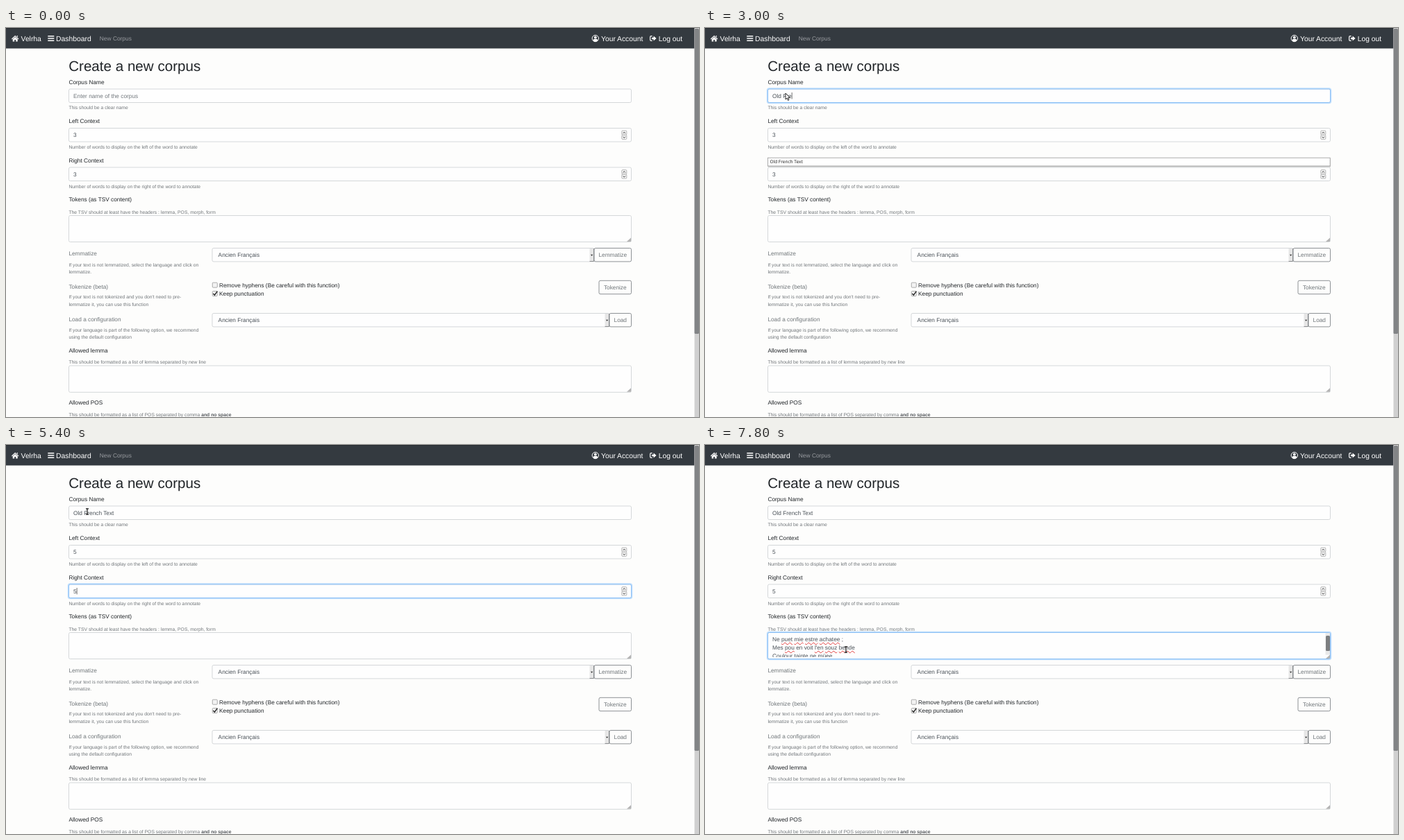
An HTML page that plays this animation: 998x561 px, repeating every 8 s.

```html
<!DOCTYPE html>
<html lang="en">
<head>
<meta charset="utf-8">
<title>Create a new corpus</title>
<style>
  html, body { margin: 0; width: 100%; height: 100%; overflow: hidden; background: #fdfdfc; }
  #stage { position: absolute; left: 0; top: 0; width: 998px; height: 561px; overflow: hidden; }
  svg { position: absolute; left: 0; top: 0; }
  text, #verse { font-family: "Liberation Sans", Arial, sans-serif; text-rendering: geometricPrecision; white-space: pre; }
  .label { font-size: 8.3px; fill: #212529; }
  .soft { font-size: 8.3px; fill: #6f7579; }
  .value { font-size: 8.3px; fill: #495057; }
  .help { font-size: 6.81px; fill: #72777b; }
  .brand { font-size: 10.3px; fill: #fff; }
  .box { fill: #fefefe; stroke: #cbced1; stroke-width: .8; }
  .button { fill: #fdfdfc; stroke: #71777c; stroke-width: .8; }
  .focus { fill: none; stroke: #84bdf6; stroke-width: .9; }
  .glow { fill: none; stroke: #bfdefd; stroke-width: 1.6; }
  #pane { position: absolute; left: 97px; top: 273.5px; width: 790px; height: 32px; overflow: hidden; }
  #verse { font-size: 8.3px; line-height: 12.48px; color: #495057; }
  #verse u { text-decoration: underline wavy #e23b3b .5px; text-underline-offset: 1px; text-decoration-skip-ink: none; }
  #verse i { display: inline-block; width: .7px; height: 9px; background: #333; vertical-align: -1.5px; }
</style>
</head>
<body>
<div id="stage">
  <svg id="page" width="998" height="561"></svg>
  <div id="pane"><div id="verse"></div></div>
  <svg id="over" width="998" height="561"></svg>
</div>
<script>
const $ = id => document.getElementById(id);
let layer = $('page');

function add(tag, attrs, parent = layer) {
  const el = document.createElementNS('http://www.w3.org/2000/svg', tag);
  for (const k in attrs) el.setAttribute(k, attrs[k]);
  return parent.appendChild(el);
}
function text(x, y, str, cls, more = {}) {
  const el = add('text', { x, y, class: cls, ...more });
  el.textContent = str;
  return el;
}
const rect = (x, y, width, height, more) => add('rect', { x, y, width, height, ...more });
const path = (d, more) => add('path', { d, ...more });
const group = () => add('g', {});
const show = (el, on) => el.style.display = on ? '' : 'none';

const label = (y, str) => text(90.4, y, str, 'label');
const help = (y, ...rows) => rows.forEach((s, i) => text(90.4, y + i * 10.1, s, 'help'));
const box = (y, h = 19.5, x = 90.5, w = 810) => rect(x, y, w, h, { rx: 2, class: 'box' });

function button(x, y, str) {
  rect(x, y, 900.5 - x, 19.4, { rx: 2, class: 'button' });
  text((x + 900.5) / 2, y + 12.7, str, 'soft', { 'text-anchor': 'middle' });
}
function select(y, right) {
  box(y, 19.4, 297, right - 297);
  text(305.6, y + 12.7, 'Ancien Français', 'value');
  rect(right - 6.5, y + .5, 6, 18.5, { fill: '#e6e6e6' });
  path(`M${right - .5} ${y + .5}v18.5h-6`, { fill: 'none', stroke: '#77797b', 'stroke-width': .8 });
  path(`M${right - 5} ${y + 9.2}h3.2l-1.6 2z`, { fill: '#222' });
}
function spinner(y) {
  for (const [dy, d] of [[0, 'M888.6 4l1.7-1.9 1.7 1.9'], [6.3, 'M888.6 2.4l1.7 1.9 1.7-1.9']]) {
    const g = add('g', { transform: `translate(0 ${y + dy})`, fill: 'none' });
    add('rect', { x: 886.8, y: 0, width: 7, height: 6.2, rx: 1.2, stroke: '#9c9c9c', 'stroke-width': .7, fill: '#f4f4f4' }, g);
    add('path', { d, stroke: '#333', 'stroke-width': .9 }, g);
  }
}
function grip(y) {
  path(`M900 ${y - 5.5}V${y}h-6z`, { fill: '#b4b4b4' });
}
function check(y, on) {
  rect(297.3, y, 7, 7, { rx: 1, fill: '#f3f3f3', stroke: '#8b8b8b', 'stroke-width': .7 });
  if (on) path(`M298.4 ${y + 3.4}l2 2.2 4-5.6`, { fill: 'none', stroke: '#222', 'stroke-width': 1.4 });
}

// Navigation bar and page scrollbar
rect(0, 0, 991.5, 29.5, { fill: '#343a40' });
rect(0, 0, 998, .9, { fill: '#25292c' });
path('M8 15.6L13.2 10.8 18.4 15.6 17.6 16.4 13.2 12.3 8.8 16.4zM9.7 16.2L13.2 13 16.7 16.2V19.6H14.2V17H12.2V19.6H9.7zM15.6 11h1.3v2.2l-1.3-1.2z', { fill: '#fff' });
text(21.6, 18.8, 'Velrha', 'brand');
path('M60.3 11.7h9M60.3 15h9M60.3 18.3h9', { stroke: '#fff', 'stroke-width': 1.5 });
text(72, 18.8, 'Dashboard', 'brand', { style: 'font-size:10.4px' });
text(134.8, 18, 'New Corpus', 'soft', { style: 'font-size:8.4px;fill:#989b9f' });
add('circle', { cx: 848.8, cy: 15, r: 4.7, fill: 'none', stroke: '#fff', 'stroke-width': 1 });
add('circle', { cx: 848.8, cy: 13.5, r: 1.9, fill: '#fff' });
path('M845.3 17.8q.8-2 2.1-2h2.8q1.3 0 2.1 2-1.3 1.9-3.5 1.9t-3.5-1.9z', { fill: '#fff' });
text(857, 18.8, 'Your Account', 'brand');
path('M930.6 11.6h-1.6q-1.3 0-1.3 1.3v4.2q0 1.3 1.3 1.3h1.6', { fill: 'none', stroke: '#fff', 'stroke-width': 1.2 });
path('M930 13.8h2.6v-2.4l4 3.6-4 3.6v-2.4H930z', { fill: '#fff' });
text(939.8, 18.8, 'Log out', 'brand');
rect(991.5, 0, 6.5, 561, { fill: '#d0d0d0' });
rect(991.5, 1, 6.5, 440, { rx: 1.5, fill: '#828486' });

// Form
text(90.2, 62, 'Create a new corpus', 'label', { style: 'font-size:20.6px' });
label(80.6, 'Corpus Name');
box(88);
help(117, 'This should be a clear name');
label(137.2, 'Left Context');
box(144.5);
spinner(148);
help(173.6, 'Number of words to display on the left of the word to annotate');
label(193.8, 'Right Context');
box(201);
spinner(204.6);
help(230.6, 'Number of words to display on the right of the word to annotate');
label(250.4, 'Tokens (as TSV content)');
help(267.7, 'The TSV should at least have the headers : lemma, POS, morph, form');
box(270.5, 38);
grip(308);

text(90.4, 328.4, 'Lemmatize', 'soft');
help(343.6, 'If your text is not lemmatized, select the language and click on', 'lemmatize.');
select(317.5, 847);
button(847, 317.5, 'Lemmatize');
text(90.4, 375.8, 'Tokenize (beta)', 'soft');
help(390.4, "If your text is not tokenized and you don't need to pre-", 'lemmatize it, you can use this function');
check(367.2, false);
check(379.6, true);
text(307, 373.7, 'Remove hyphens (Be careful with this function)', 'label');
text(307, 386.1, 'Keep punctuation', 'label');
button(854, 364.3, 'Tokenize');
text(90.4, 422.8, 'Load a configuration', 'soft');
help(437.5, 'If your language is part of the following option, we recommend', 'using the default configuration');
select(411.5, 869);
button(869, 411.5, 'Load');
label(467.6, 'Allowed lemma');
help(484.4, 'This should be formatted as a list of lemma separated by new line');
box(487, 38.3);
grip(524.8);
label(543.4, 'Allowed POS');
const last = text(90.4, 560, 'This should be formatted as a list of POS separated by comma ', 'help');
add('tspan', { 'font-weight': 'bold', fill: '#55595d' }, last).textContent = 'and no space';

// Live parts
const title = 'Old French Text';
const nameText = text(97, 100.9, '', 'value');
const sel = rect(96.6, 0, 5.4, 10, { fill: '#3f87d6' });
const leftText = text(97, 157.4, '', 'value');
const rightText = text(97, 214, '', 'value');
const caret = rect(0, 0, .7, 9.4, { fill: '#333' });

const fields = [[88, 19.5], [144.5, 19.5], [201, 19.5], [270.5, 38]];
const rings = fields.map(([y, h]) => {
  const g = group();
  add('rect', { x: 89.5, y: y - 1, width: 812, height: h + 2, rx: 3, class: 'glow' }, g);
  add('rect', { x: 90.5, y, width: 810, height: h, rx: 2, class: 'focus' }, g);
  return g;
});

const bar = group();
add('rect', { x: 893.6, y: 271.2, width: 6.4, height: 31.4, fill: '#e9e9e9' }, bar);
const thumb = add('rect', { x: 894, width: 6, height: 22, rx: 1.5, fill: '#7c7e80' }, bar);

const popup = group();
add('rect', { x: 90.5, y: 188, width: 810.5, height: 12.4, fill: '#000', opacity: .2 }, popup);
add('rect', { x: 90.4, y: 187.2, width: 809.8, height: 11.8, fill: '#fff', stroke: '#999', 'stroke-width': .8 }, popup);
add('text', { x: 93.4, y: 194.9, fill: '#222', style: 'font:6.5px "Noto Sans",sans-serif' }, popup).textContent = title;

// A tilde marks a word the spell checker underlines
$('verse').innerHTML = [
  'Ne ~puet ~mie ~estre ~achatee ;',
  "Mes ~pou en voit ~l'en ~souz ~bende",
  'Coulour ~tainte ne ~müee',
  'Que ~li ~cuers ~en ~soit ~dolanz',
  'Et ~la ~joie ~oubliee,',
  'Se ~merci ~ne ~m\'est ~donee',
  "Mes ~s'ele ~ne ~m'i ~aboivre",
  'Par amours ~et ~guerredoune,',
  'Martyrs ~serai ~sanz ~couroune. <i></i>'
].join('\n').replace(/~([^\s,.;]+)/g, '<u>$1</u>');

layer = $('over');
const beam = path('M-2-4.2H-.6L0-3.6 .6-4.2H2M0-3.6V3.6M-2 4.2H-.6L0 3.6 .6 4.2H2',
  { fill: 'none', stroke: '#111', 'stroke-width': 1.2, style: 'filter:drop-shadow(0 0 .5px #fff)' });
const arrow = path('M-1-2V7L1 5.1 2.5 8.4 4 7.7 2.5 4.6H5.4z', { fill: '#fff', stroke: '#111', 'stroke-width': .9 });

const track = [[200, 158, 16], [1200, 117, 96], [6400, 117, 96], [7200, 203, 295], [8000, 203, 295]];
const lift = [[0, -79.1], [6800, -79.1], [7800, .3], [8000, .3]];

function at(table, t, i) {
  let k = table.findIndex(r => r[0] > t);
  if (k < 0) k = table.length - 1;
  if (!k) return table[0][i];
  const a = table[k - 1], b = table[k];
  const p = (t - a[0]) / (b[0] - a[0]);
  return a[i] + (b[i] - a[i]) * p * p * (3 - 2 * p);
}

function draw(t) {
  const typed = t < 2400 ? 0 : Math.min(title.length, Math.round((t - 2200) / 120));
  const focus = t < 1800 ? -1 : t < 4600 ? 0 : t < 5200 ? 1 : t < 5600 ? 2 : 3;
  const picked = t === 4600 || t === 5200;
  const pasted = t >= 5800;

  nameText.textContent = typed ? title.slice(0, typed) : 'Enter name of the corpus';
  nameText.style.fill = typed ? '' : '#72787d';
  leftText.textContent = t < 4800 ? 3 : 5;
  rightText.textContent = t < 5400 ? 3 : 5;
  leftText.style.fill = t === 4600 ? '#fff' : '';
  rightText.style.fill = t === 5200 ? '#fff' : '';
  rings.forEach((r, i) => show(r, i === focus));

  show(sel, picked);
  if (focus >= 0) sel.setAttribute('y', fields[focus][0] + 4.8);
  show(caret, focus >= 0 && !picked && !pasted);
  if (focus >= 0) {
    const el = [nameText, leftText, rightText][focus];
    const filled = el && (focus > 0 || typed);
    caret.setAttribute('x', 97.1 + (filled ? el.getComputedTextLength() : 0));
    caret.setAttribute('y', fields[focus][0] + 5);
  }

  const popped = t >= 2400 && t < 4600;
  show(popup, popped);
  show($('pane'), pasted);
  show(bar, pasted);
  const shift = at(lift, t, 1);
  $('verse').style.transform = `translateY(${shift}px)`;
  thumb.setAttribute('y', 280 - 5 * (shift + 79.1) / 79.4);

  const x = at(track, t, 1), y = at(track, t, 2);
  const inField = fields.some(([top, h]) => y >= top && y <= top + h);
  show(beam, t >= 200 && inField && !popped);
  show(arrow, t >= 200 && (!inField || popped));
  for (const c of [beam, arrow]) c.setAttribute('transform', `translate(${x} ${y})`);
}

let shown = -1;
function tick() {
  const t = Math.floor(performance.now() % 8000 / 200) * 200;
  if (t !== shown) draw(shown = t);
  requestAnimationFrame(tick);
}
tick();
</script>
</body>
</html>
```
